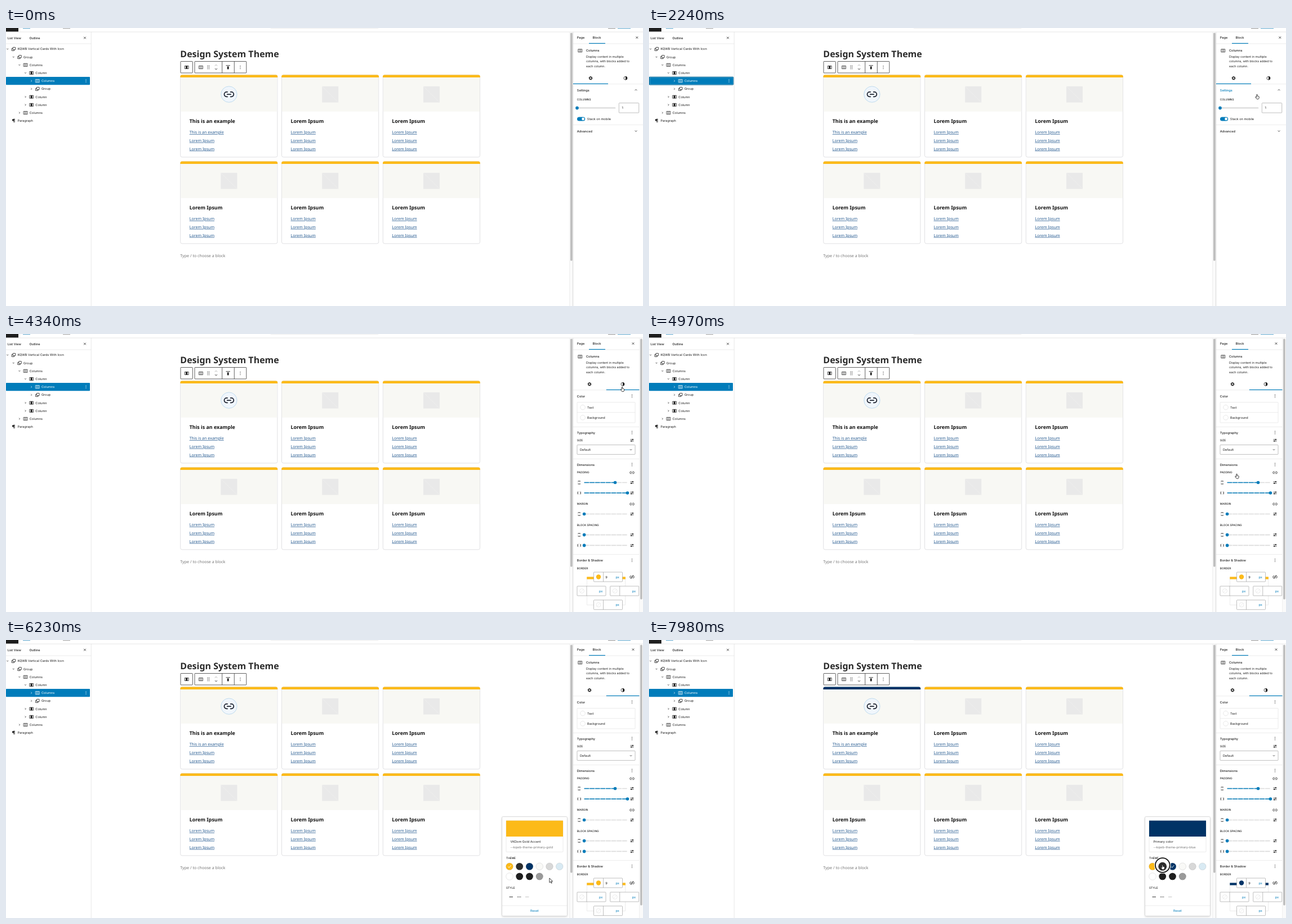
An HTML page that plays this animation: 1131 px wide and 495 px high, repeating every 8 s.

```html
<!DOCTYPE html>
<html lang="en">
<head>
<meta charset="utf-8">
<title>Block editor</title>
<style>
  html, body { margin: 0; width: 100%; height: 100%; overflow: hidden; background: #fff; }
  svg { display: block; width: 100%; height: 100%; text-rendering: geometricPrecision; }
  text { font-family: Inter, Roboto, sans-serif; white-space: pre; }
  .page { font-family: "Noto Sans", "Open Sans", sans-serif; }
  .link { fill: #255a90; text-decoration: underline; }
</style>
</head>
<body>
<svg id="stage" viewBox="0 0 1131 495" preserveAspectRatio="none"></svg>
<script>
const INK = '#1e1e1e', BLUE = '#007cba', GOLD = '#fcba19', NAVY = '#003366';
const LOOP = 8000, STEP = 70;

// Drawing helpers
const rect = (x, y, w, h, fill, more = '') =>
  `<rect x="${x}" y="${y}" width="${w}" height="${h}" fill="${fill}" ${more}/>`;
const box = (x, y, w, h, c = '#949494', more = '') =>
  rect(x, y, w, h, '#fff', `stroke="${c}" stroke-width=".6" rx="1" ${more}`);
const dot = (x, y, r, fill, more = '') => `<circle cx="${x}" cy="${y}" r="${r}" fill="${fill}" ${more}/>`;
const path = (d, c = INK, w = .8, more = '') =>
  `<path d="${d}" fill="none" stroke="${c}" stroke-width="${w}" ${more}/>`;
const text = (x, y, s, size = 5.6, fill = INK, more = '') =>
  `<text x="${x}" y="${y + size * .36}" font-size="${size}" fill="${fill}" ${more}>${s}</text>`;
const bold = (x, y, s, more = '') => text(x, y, s, 5.6, INK, 'font-weight="550" ' + more);
const label = (x, y, s) => text(x, y, s, 4.85, INK, 'font-weight="500"');
const page = (x, y, s, size, fill, more = '') => text(x, y, s, size, fill, 'class="page" ' + more);
const hline = (x1, x2, y, c = '#e0e0e0') => path(`M${x1} ${y}H${x2}`, c, .6);
const group = (id, body, more = '') => `<g id="${id}" ${more}>${body}</g>`;

// Icons, placed by their centre
const icons = {
  columns: (x, y, c) => path(`M${x - 3.5} ${y - 2.6}h7v5.2h-7zM${x - 1.2} ${y - 2.6}v5.2M${x + 1.2} ${y - 2.6}v5.2`, c, .7),
  column: (x, y, c) => path(`M${x - 3.4} ${y - 2.5}h6.8v5h-6.8z`, c, .8) + rect(x - 1.5, y - 2.5, 3, 5, c),
  group: (x, y, c) => path(`M${x - 1.2} ${y - 3}h4.4v4.2h-4.4zM${x - 1.2} ${y - 1}h-2v4h4.4v-1.8`, c, .8),
  para: (x, y, c) => path(`M${x + .4} ${y - 3}v6M${x + 1.8} ${y - 3}v6M${x + 2.6} ${y - 3}h-3`, c, .8) + dot(x - .7, y - 1.3, 1.8, c),
};
const caret = (x, y, dir, c = INK, s = 1.6) => path({
  right: `M${x - s / 2} ${y - s}l${s} ${s}l${-s} ${s}`,
  down: `M${x - s} ${y - s / 2}l${s} ${s}l${s} ${-s}`,
  up: `M${x - s} ${y + s / 2}l${s} ${-s}l${s} ${s}`,
}[dir], c, .8);
const cross = (x, y) => path(`M${x - 1.8} ${y - 1.8}l3.6 3.6m0 -3.6l-3.6 3.6`, INK, .8);
const dots = (x, y, c = INK) => [-2.3, 0, 2.3].map(d => dot(x, y + d, .6, c)).join('');
const chain = (x, y, k, c = INK, w = .8) => path(
  `M${x - k} ${y - 2 * k}h${-k}a${2 * k} ${2 * k} 0 0 0 0 ${4 * k}h${k}M${x + k} ${y - 2 * k}h${k}a${2 * k} ${2 * k} 0 0 1 0 ${4 * k}h${-k}M${x - 1.8 * k} ${y}h${3.6 * k}`, c, w);
const sliders = (x, y) => path(`M${x - 3} ${y - 1.4}h6M${x - 3} ${y + 1.4}h6`, INK, .8) +
  dot(x + 1.2, y - 1.4, 1.1, INK) + dot(x - 1.2, y + 1.4, 1.1, INK);
const half = (x, y) => dot(x, y, 3, '#fff', `stroke="${INK}" stroke-width=".8"`) +
  `<path d="M${x} ${y - 3}a3 3 0 0 1 0 6z" fill="${INK}"/>`;
const gear = (x, y) => dot(x, y, 2, 'none', `stroke="${INK}" stroke-width="1.4"`) +
  dot(x, y, 3, 'none', `stroke="${INK}" stroke-width="1" stroke-dasharray="1.45 1.69"`);

function topBar() {
  return rect(0, 0, 22, 6.5, INK) + rect(30, 0, 13, .9, '#4a9cc9') + rect(101, 0, 13, .8, '#888') +
    rect(470, 0, 191, .6, '#e4e4e4') + rect(1069, 0, 13, .8, '#777') + rect(1086, 0, 23, .9, '#4a9cc9') +
    hline(0, 1131, 7, '#d4d4d4');
}

function listView() {
  const rows = [
    [0, 'down', 'group', 'KQWB Vertical Cards With Icon'], [1, 'down', 'group', 'Group'],
    [2, 'down', 'columns', 'Columns'], [3, 'down', 'column', 'Column'],
    [4, 'right', 'columns', 'Columns'], [4, 'right', 'group', 'Group'],
    [3, 'right', 'column', 'Column'], [3, 'right', 'column', 'Column'],
    [2, 'right', 'columns', 'Columns'], [0, '', 'para', 'Paragraph'],
  ];
  return bold(2.7, 17.5, 'List View') + bold(41.5, 17.5, 'Outline') + cross(140, 17.5) +
    hline(0, 151, 28) + path('M151.2 7V495', '#ddd', .7) +
    rect(0, 87, 149, 14.2, BLUE, 'rx="1"') +
    group('rowFocus', rect(.5, 87.2, 149.4, 13.9, BLUE, 'stroke="#00608f" stroke-width="1" rx="1"') +
      rect(1.2, 88, 148, 12.3, 'none', 'stroke="#8cc3df" stroke-width=".5"')) +
    rows.map(([depth, open, icon, name], i) => {
      const x = depth * 10.6, y = 37.4 + i * 14.2, c = i === 4 ? '#fff' : INK;
      return (open && caret(x + 2.7, y, open, c, 1.4)) + icons[icon](x + 13.4, y, c) + text(x + 20.5, y, name, 5.6, c);
    }).join('') + dots(142, 94.2, '#fff');
}

function toolbar() {
  let grip = '';
  for (let i = 0; i < 6; i++) grip += dot(358 + i % 2 * 2.6, 67.4 + (i >> 1) * 2.6, .65, INK);
  return rect(310, 59.5, 21.3, 20.5, '#fff', `stroke="${INK}" stroke-width=".7" rx=".8"`) +
    rect(335, 59.5, 91.8, 20.5, '#fff', `stroke="${INK}" stroke-width=".7" rx=".8"`) +
    path('M383.7 59.5v20.5M405.3 59.5v20.5', INK, .7) +
    icons.column(320.7, 70, INK) + icons.columns(346, 70, INK) + grip +
    caret(373, 66.3, 'up', '#999', 2) + caret(373, 73, 'down', INK, 2) +
    path('M390.5 66.8h7.4', INK, .9) + rect(392.8, 68.4, 2.8, 5, INK) + dots(416, 70);
}

function card(col, row) {
  const x = 309.7 + col * 179.8, y = 83.6 + row * 154, first = !col && !row, cx = x + 86.2;
  const names = first ? ['This is an example', 'This is an example'] : ['Lorem Ipsum', 'Lorem Ipsum'];
  const picture = first
    ? dot(cx, y + 34.5, 14.2, '#f0f6fc', 'stroke="#aacfe8" stroke-width=".7"') + chain(cx, y + 34.5, 2.1, '#1f2430', 1.8)
    : rect(cx - 14.5, y + 20.2, 29, 28.8, '#e9e9e9') + path(`M${cx - 14.5} ${y + 20.2}l29 28.8`, '#f1f1f0', .7);
  return rect(x, y, 172.2, 146.3, '#fff', 'rx="3" stroke="#d9d9dc" stroke-width=".8"') +
    rect(x + .4, y + 4, 171.4, 61.2, '#f8f8f4') +
    `<path ${first ? 'class="accent"' : ''} d="M${x - .3} ${y + 4.4}v-1.6a3 3 0 0 1 3 -3h166.8a3 3 0 0 1 3 3v1.6z" fill="${GOLD}"/>` +
    picture + page(x + 16, y + 81.8, names[0], 8.9, '#111', 'font-weight="700"') +
    [names[1], 'Lorem Ipsum', 'Lorem Ipsum'].map((s, i) =>
      `<text class="page link" x="${x + 16}" y="${y + 104.4 + i * 14.8}" font-size="7.08">${s}</text>`).join('');
}

function canvas() {
  let cards = '';
  for (let i = 0; i < 6; i++) cards += card(i % 3, i / 3 | 0);
  return page(309.3, 46, 'Design System Theme', 16, '#2b2b2b', 'font-weight="700"') + toolbar() + cards +
    rect(310, 84, 172, 65, BLUE, 'id="flash"') +
    page(309.3, 405, 'Type / to choose a block', 7.1, '#757575') +
    rect(1000.5, 7.4, 6, 488, '#fafafa') + path('M1000.5 7.4V495', '#e6e6e6', .6) +
    rect(1002, 8.5, 3.6, 406, '#bdbdbd', 'rx="1.6"') + path('M1006.6 7.4V495', '#ccc', .8);
}

function panelHead() {
  return bold(1013.8, 17, 'Page') + bold(1041.5, 17, 'Block') + hline(1007, 1131, 28) +
    rect(1035, 26.8, 29, 1.2, BLUE) + icons.columns(1019.3, 40.3, INK) + bold(1030, 40.3, 'Columns') +
    ['Display content in multiple', 'columns, with blocks added to', 'each column.']
      .map((s, i) => text(1030, 51.2 + i * 8.2, s, 5.35)).join('') + hline(1007, 1131, 99.8);
}

function settingsPanel() {
  return cross(1120.3, 17) + gear(1038, 89.3) + half(1100, 89.3) +
    bold(1013.8, 110.5, 'Settings', 'id="settings"') + caret(1118.5, 110.3, 'up', INK, 1.9) +
    label(1013.8, 127, 'COLUMNS') + path('M1014 142.4h67.5', '#d2d2d2', 1.6, 'stroke-linecap="round"') +
    dot(1014, 142.4, 2.8, BLUE) + box(1088.3, 133.5, 35.4, 17.5) + text(1093.5, 142.4, '1') +
    rect(1014, 158.4, 14.2, 7, BLUE, 'rx="3.5"') + dot(1024.6, 161.9, 2.4, '#fff') +
    text(1031.8, 162, 'Stack on mobile') + hline(1007, 1131, 172.4) +
    bold(1013.8, 183.5, 'Advanced') + caret(1118.5, 183.5, 'down', INK, 1.9);
}

function spacing(y, value, vertical) {
  const x = 1026.6, end = 1103.4, at = x + (end - x) * value;
  const sides = vertical ? 'M1015.2 262.3v4.4M1020.2 262.3v4.4' : 'M1015.5 262h4.4M1015.5 267h4.4';
  return rect(1015.1, y - 2.6, 5.2, 5.2, 'none', 'rx="1" stroke="#aaa" stroke-width=".5" stroke-dasharray="1 1"') +
    path(sides, INK, .9, `transform="translate(0 ${y - 264.5})"`) +
    path(`M${x} ${y}H${end}`, '#dcdcdc', 1.6, 'stroke-dasharray="8.8 .8"') +
    path(`M${x} ${y}H${at}`, BLUE, 1.6, 'stroke-dasharray="8.8 .8"') +
    dot(at, y, 2.8, BLUE) + sliders(1111.5, y);
}

function edge(x, y, value) {
  return box(x, y, 51, 17) + path(`M${x + 17} ${y}v17`, '#949494', .6) +
    (value ? `<circle class="accent" cx="${x + 8.5}" cy="${y + 8.5}" r="4.2"/>` + text(x + 20.8, y + 8.5, value)
      : dot(x + 8.5, y + 8.5, 4, '#fff', 'stroke="#ddd" stroke-width=".6"') + path(`M${x + 5.8} ${y + 11.2}l5.4 -5.4`, '#ddd', .5)) +
    text(x + 39, y + 8.5, 'px', 5.6, BLUE);
}

function stylesPanel() {
  const section = (y, s) => bold(1013.8, y, s) + dots(1111.5, y);
  const swatch = (y, s, id) => dot(1024, y, 4.3, '#fff', 'stroke="#ddd" stroke-width=".7"') + text(1032, y, s, 5.6, INK, `id="${id}"`);
  return cross(1113.5, 17) + gear(1036, 89.3) + half(1095, 89.3) +
    section(110.5, 'Color') + box(1014, 121.5, 103, 36.5, '#ddd') + hline(1014, 1117, 139.7) +
    swatch(130.6, 'Text', 'hoverText') + swatch(148.8, 'Background', 'hoverBack') + hline(1007, 1124, 165.4) +
    section(175.5, 'Typography') + label(1013.8, 189.5, 'SIZE') + sliders(1111.5, 189.2) +
    box(1014, 197.4, 103, 17) + text(1019, 206, 'Default') + caret(1109.5, 206, 'down') + hline(1007, 1124, 222.4) +
    section(232.5, 'Dimensions') + label(1013.8, 246.6, 'PADDING') + chain(1111.5, 246.8, .95) +
    spacing(264.5, .715) + spacing(283, 1, true) +
    label(1013.8, 302.6, 'MARGIN') + chain(1111.5, 302.8, .95) + spacing(320.5, 0) +
    label(1013.8, 340, 'BLOCK SPACING') + spacing(357.6, 0) + spacing(376.4, 0, true) + hline(1007, 1124, 392.4) +
    section(402.8, 'Border &amp; Shadow') + label(1013.8, 417, 'BORDER') +
    rect(1031.5, 433, 68, 49.5, 'none', 'stroke="#e8e8e8" stroke-width=".8"') +
    '<rect class="accent" x="1031.3" y="432.4" width="68.6" height="4.2"/>' +
    edge(1043.5, 424, '9') + edge(1014, 449) + edge(1072.7, 449) + edge(1043.5, 473.7) +
    chain(1111.5, 432.6, .95) + path('M1109.6 436l4 -7', INK, .8) +
    rect(1043.5, 424, 17, 17, 'none', `id="swatchFocus" stroke="${BLUE}" stroke-width="1"`) +
    rect(1124.6, 7.4, 6.4, 488, '#fafafa') + path('M1124.6 7.4V495', '#e6e6e6', .6) +
    rect(1126.1, 8.5, 3.6, 464, '#bdbdbd', 'rx="1.6"');
}

const colors = [GOLD, '#2d2d2d', NAVY, '#f9f9f7', '#d8d8d8', '#d9eaf3', '#fff', INK, INK, '#9a9a9a'];
const swatchX = i => 894 + i % 6 * 17.75;
function popover() {
  return rect(880.6, 314.6, 115.8, 176.8, '#fff', 'rx="2" stroke="#ccc" stroke-width=".7" filter="url(#soft)"') +
    box(888, 321.6, 101, 55.8, '#ddd') + '<rect class="accent" x="888" y="321.6" width="101" height="28.4"/>' +
    text(895.4, 359.4, '', 5.6, INK, 'id="colorName"') + text(895.4, 368.5, '', 5.6, '#757575', 'id="colorVar"') +
    label(888, 388.2, 'THEME') +
    colors.map((c, i) => dot(swatchX(i), i < 6 ? 403.2 : 421, 6.3, c, `id="sw${i}" stroke="#00000033" stroke-width=".5"`)).join('') +
    path('M-2.6 .2l1.8 1.9l3.6 -4.2', '#fff', .9, 'id="check"') +
    label(888, 441.2, 'STYLE') + path('M893.5 457.5h6.5', INK, .9) +
    path('M907.8 457.5h6.5', INK, .9, 'stroke-dasharray="1.5 1"') + path('M922 457.5h6.5', '#aaa', .7) +
    hline(880.6, 996.4, 473, '#ddd') + text(938.5, 482.4, 'Reset', 5.6, BLUE, 'text-anchor="middle"');
}

const stage = document.getElementById('stage');
stage.innerHTML = '<defs><filter id="soft" x="-10%" y="-10%" width="120%" height="120%">' +
  '<feDropShadow dx="0" dy="1.2" stdDeviation="1.8" flood-opacity=".16"/></filter></defs>' +
  rect(0, 0, 1131, 495, '#fff') + topBar() + listView() + canvas() + panelHead() +
  group('panelA', settingsPanel()) + group('panelB', stylesPanel()) +
  rect(1007, 98.8, 62, 1.2, BLUE, 'id="tabLine"') + group('pop', popover()) +
  group('ring', '<circle fill="none" stroke="#fff" stroke-width="4"/><circle fill="none" stroke="#111" stroke-width="1.8"/>') +
  group('cursor', '<path id="arrow" d="M0 0v8l1.9 -1.7l1.3 2.9l1.3 -.6l-1.3 -2.8h2.5z"/>' +
    '<path id="hand" d="M-.8 .8a.8 .8 0 0 1 1.6 0v2.1l2 .5q1.1 .3 1 1.4l-.5 2.2q-.3 1.3 -1.2 1.3h-1.9q-.6 0 -.9 -.5l-2 -2.8q-.3 -.8 .4 -.9q.6 0 1.5 .9z"/>',
    'fill="#fff" stroke="#111" stroke-width=".8" stroke-linejoin="round"');

const el = {};
stage.querySelectorAll('[id]').forEach(n => el[n.id] = n);
const accents = stage.querySelectorAll('.accent');
const set = (n, props) => { for (const k in props) n.setAttribute(k, props[k]); };
const show = (n, on) => n.setAttribute('display', on ? 'inline' : 'none');
const clamp = v => Math.min(1, Math.max(0, v));
const smooth = v => v * v * (3 - 2 * v);

// Pointer tip: time, x, y
const track = [
  [140, 556, 500], [840, 87, 92], [1890, 87, 92], [2240, 1079.5, 118.3], [2450, 1089, 138],
  [2730, 1083, 112], [3010, 1100.5, 88.6], [4060, 1100.5, 88.6], [4340, 1094, 94.2], [4900, 1043, 241],
  [5460, 1055.2, 431], [5740, 1055.2, 431], [6440, 940, 422], [6860, 929.7, 402], [7140, 929.7, 402], [7840, 911.7, 400.4],
];
// Click rings: from, to, x, y, radius
const clicks = [[980, 1120, 87, 94, 9.5], [3290, 3430, 1101, 89, 12.8], [5530, 5670, 1056, 430, 12.8],
  [6860, 7000, 929.6, 403, 8], [7980, 8000, 911.8, 401, 12.8]];

function pointer(t) {
  const i = track.findIndex(k => k[0] > t);
  if (i < 1) return (i ? track[track.length - 1] : track[0]).slice(1);
  const [a, b] = [track[i - 1], track[i]], p = smooth((t - a[0]) / (b[0] - a[0]));
  return [a[1] + (b[1] - a[1]) * p, a[2] + (b[2] - a[2]) * p];
}

function render(t) {
  const [x, y] = pointer(t), styles = t >= 3500, navy = t >= 7000, accent = navy ? NAVY : GOLD;
  const over = (top, bottom) => x > 1007 && y > top && y < bottom ? BLUE : INK;

  show(el.cursor, t >= 210);
  el.cursor.setAttribute('transform', `translate(${x} ${y})`);
  const hand = x < 151 || x > 1007 || t >= 6580;
  show(el.hand, hand);
  show(el.arrow, !hand);

  const click = clicks.find(c => t >= c[0] && t < c[1]);
  show(el.ring, click);
  if (click) for (const c of el.ring.children) set(c, { cx: click[2], cy: click[3], r: click[4] });

  show(el.rowFocus, t >= 1120 && t < 3290);
  el.flash.setAttribute('opacity', t >= 1120 ? .08 * clamp((1400 - t) / 280) : 0);

  show(el.panelA, !styles);
  show(el.panelB, styles);
  el.settings.setAttribute('fill', over(101, 121));
  el.hoverText.setAttribute('fill', over(121.5, 139.7));
  el.hoverBack.setAttribute('fill', over(139.7, 158));
  const tab = smooth(clamp((t - 3450) / 260));
  set(el.tabLine, { x: 1007 + 58.8 * tab, width: 62 - 3.4 * tab });

  show(el.swatchFocus, t >= 5530 && t < 5810);
  const open = 1 - (1 - clamp((t - 5650) / 160)) ** 2;
  show(el.pop, open > 0 && t >= 5670);
  set(el.pop, { opacity: open, transform: `translate(1005 491.4) scale(${open}) translate(-1005 -491.4)` });

  accents.forEach(n => n.setAttribute('fill', accent));
  el.colorName.textContent = navy ? 'Primary color' : 'VKDom Gold Accent';
  el.colorVar.textContent = '--kqwb-theme-primary-' + (navy ? 'blue' : 'gold');
  el.check.setAttribute('transform', `translate(${swatchX(navy ? 2 : 0)} 403.2)`);
  colors.forEach((c, i) => {
    const near = Math.hypot(x - swatchX(i), y - (i < 6 ? 403.2 : 421)) < 6.5;
    el['sw' + i].setAttribute('r', near && t > 6440 ? 7.4 : 6.3);
  });
}

const start = performance.now();
function tick() {
  const t = (performance.now() - start) % LOOP;
  render(Math.floor(t / STEP) * STEP);
  requestAnimationFrame(tick);
}
tick();
</script>
</body>
</html>
```
